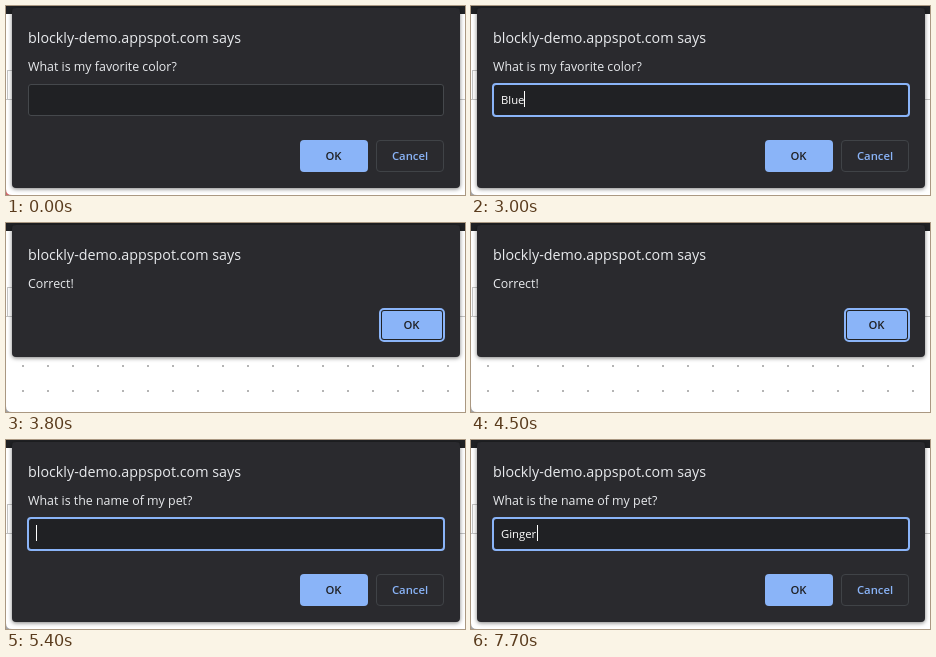
An HTML page that plays this animation: 459 px wide and 189 px high, repeating every 8 s.

```html
<!DOCTYPE html>
<html lang="en">
<head>
<meta charset="utf-8">
<title>Prompt dialogs</title>
<style>
  html, body { margin: 0; width: 100%; height: 100%; overflow: hidden; background: #fff; }
  svg { display: block; width: 100vw; height: 100vh; }
  text { font-family: "Open Sans", "Noto Sans", sans-serif; fill: #e8eaed; white-space: pre; }
  .title { font-size: 14.3px; }
  .msg { font-size: 12.4px; }
  .entry { font-size: 11.3px; fill: #fff; }
  .btn { font-size: 11.3px; font-weight: 600; text-anchor: middle; }
  .tab { font: 16px "Liberation Sans", Arial, sans-serif; fill: #000; }
</style>
</head>
<body>
<svg id="stage" viewBox="0 0 459 189">
  <defs>
    <filter id="shadow" x="-5%" y="-10%" width="110%" height="120%">
      <feDropShadow dx="0" dy="1" stdDeviation="2" flood-color="#000" flood-opacity=".5"/>
    </filter>
    <pattern id="dots" x="16" y="142" width="25" height="25" patternUnits="userSpaceOnUse">
      <rect width="2" height="2" fill="#b4b4b4"/>
    </pattern>
  </defs>
  <rect id="corner" width="459" height="189"/>
  <path d="M0 0H459V189H6Q0 189 0 183Z" fill="#fff"/>
  <rect y="94" width="459" height="91" fill="url(#dots)"/>
  <g id="tabs" fill="none" stroke="#c4c4c4"><path d="M0 93.5H459"/></g>
  <rect width="459" height="8" fill="#202124"/>
  <g id="dialogs"></g>
</svg>
<script>
const LOOP = 8000, STEP = 100;
const BLUE = '#8ab4f8', DARK = '#202124';
const NS = 'http://www.w3.org/2000/svg';
const $ = id => document.getElementById(id);

function add(parent, tag, attrs, text) {
  const el = document.createElementNS(NS, tag);
  set(el, attrs);
  if (text) el.textContent = text;
  parent.appendChild(el);
  return el;
}

function set(el, attrs) {
  for (const key in attrs) el.setAttribute(key, attrs[key]);
}

const box = (parent, x, y, width, height, rx, attrs) =>
  add(parent, 'rect', { x, y, width, height, rx, ...attrs });

const label = (parent, kind, x, y, text, attrs) =>
  add(parent, 'text', { class: kind, x, y, stroke: 'none', ...attrs }, text);

function makeDialog(message, bottom) {
  const g = add($('dialogs'), 'g');
  box(g, 6, 2, 448, bottom - 2, 4, { fill: '#292a2d', filter: 'url(#shadow)' });
  label(g, 'title', 22, 37, 'blockly-demo.appspot.com says');
  label(g, 'msg', 22, 65, message);
  return { g };
}

function makePrompt(message) {
  const d = makeDialog(message, 182), g = d.g;
  box(g, 22.5, 78.5, 415, 31, 2.5, { fill: DARK, stroke: '#45484c' });
  d.ring = box(g, 22, 78, 416, 32, 3, { fill: 'none', stroke: BLUE, 'stroke-width': 2 });
  d.entry = label(g, 'entry', 30, 98, '');
  d.caret = box(g, 30, 85, 1, 16, 0, { fill: '#fff' });
  box(g, 294, 134, 68, 32, 4, { fill: BLUE });
  label(g, 'btn', 327.5, 154, 'OK', { style: 'fill:' + DARK });
  box(g, 370.5, 134.5, 67, 31, 3.5, { fill: 'none', stroke: '#404347' });
  label(g, 'btn', 404, 154, 'Cancel', { style: 'fill:' + BLUE });
  return d;
}

function makeAlert(message) {
  const d = makeDialog(message, 134), g = d.g;
  box(g, 374, 86, 64, 32, 4, { fill: DARK, stroke: BLUE, 'stroke-width': 2 });
  box(g, 376, 88, 60, 28, 2, { fill: BLUE });
  label(g, 'btn', 405.5, 106, 'OK', { style: 'fill:' + DARK });
  return d;
}

for (const [x, w, tx, name] of [[1, 69, 22, 'Dart'], [77, 70, 95, 'XML'], [154, 81, 172, 'JSON']]) {
  box($('tabs'), x + .5, 64.5, w, 29, 0);
  label($('tabs'), 'tab', tx, 85, name);
}

const color = makePrompt('What is my favorite color?');
const alertBox = makeAlert('Correct!');
const pet = makePrompt('What is the name of my pet?');

// Key times, caret stops and the spans in which the caret is lit
Object.assign(color, {
  word: 'Blue', keys: [1600, 1800, 2000, 2100], stops: [30, 37, 40, 47, 53],
  lit: [[900, 1400], [1600, 2600], [3000, 3400]]
});
Object.assign(pet, {
  word: 'Ginger', keys: [7000, 7100, 7300, 7500, 7600, 7700], stops: [30, 39, 42, 48, 55, 62, 66],
  lit: [[5300, 5700], [6200, 6700], [7000, LOOP]]
});

function place(d, alpha, shift, grow) {
  const s = 1 + grow;
  set(d.g, {
    opacity: alpha,
    display: alpha > 0 ? 'inline' : 'none',
    transform: `translate(${-230 * grow} ${-shift}) scale(${s})`
  });
}

// The leaving dialog lifts and fades while the next one settles from above
function enter(d, p) {
  const v = Math.min(1, Math.max(0, (p - 1 / 3) * 1.5));
  place(d, v, 25 * (1 - v), .016 * (1 - v));
}

function leave(d, p) {
  const u = Math.max(0, p / .8);
  place(d, p < 1 ? 1 - .53 * u : 0, 13.4 * u, .013 * u);
}

function type(d, t, ring) {
  const n = d.keys.filter(k => t >= k).length;
  d.entry.textContent = d.word.slice(0, n);
  set(d.caret, { x: d.stops[n], opacity: d.lit.some(([a, b]) => t >= a && t < b) ? 1 : 0 });
  set(d.ring, { opacity: ring });
}

function draw(time) {
  const t = Math.floor(time % LOOP / STEP) * STEP;
  const first = (t - 3300) / 500, second = (t - 4800) / 600;
  $('corner').setAttribute('fill', t < 800 ? '#d0686c' : '#a4a4a6');
  leave(color, first);
  if (second > 0) leave(alertBox, second); else enter(alertBox, first);
  enter(pet, second);
  type(color, t, t < 800 || t >= 3400 ? 0 : t < 900 ? .5 : 1);
  type(pet, t, 1);
}

const start = performance.now();
function tick() {
  draw(performance.now() - start);
  requestAnimationFrame(tick);
}
tick();
</script>
</body>
</html>
```
